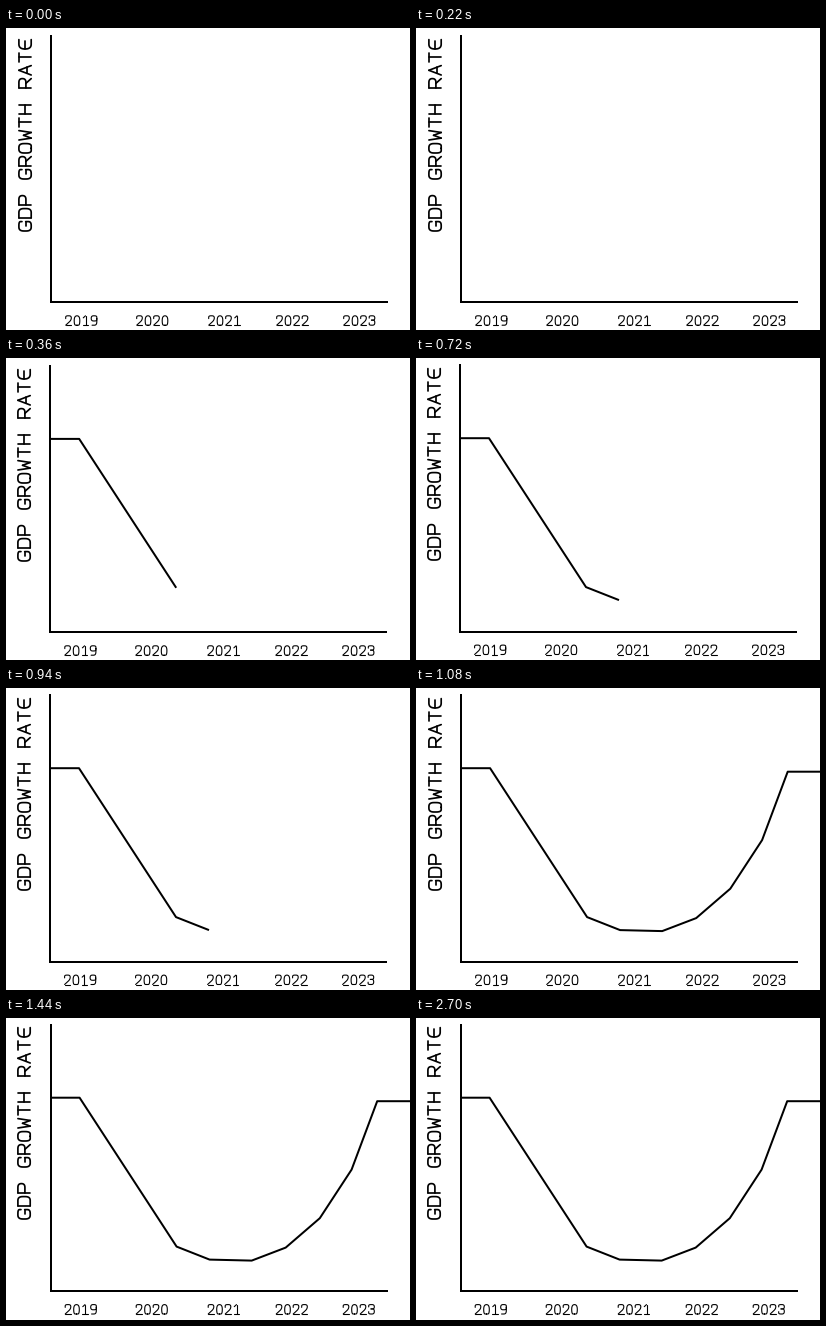
A matplotlib script that plays this animation: 404x302 px, repeating every 3540 ms.

```python
import matplotlib.pyplot as plt
import numpy as np
from matplotlib.animation import FuncAnimation
from matplotlib.collections import LineCollection

W, H, DPI = 404, 302, 64
TICK = 60            # ms per animation frame
HOLD = 6             # ticks per drawing step
TICKS = 59


def soft(*points, radius=.4):
    """One stroke through the points with its corners rounded."""
    pts = np.array(points, float)
    path = [pts[:1]]
    t = np.linspace(0, 1, 7)[:, None]
    for before, corner, after in zip(pts, pts[1:], pts[2:]):
        start, end = (corner + (p - corner) * min(.5, radius / np.hypot(*(p - corner)))
                      for p in (before, after))
        path.append((1 - t) ** 2 * start + 2 * t * (1 - t) * corner + t ** 2 * end)
    return [np.vstack(path + [pts[-1:]])]


def sharp(*points):
    return [np.array(pair, float) for pair in zip(points, points[1:])]


# Glyphs in a unit box, y pointing up.
STEM = sharp((0, 0), (0, 1))
BOWL = STEM + soft((0, 1), (1, 1), (1, .43), (0, .43))
GLYPHS = {
    "G": soft((1, .75), (1, 1), (0, 1), (0, 0), (1, 0), (1, .45)) + sharp((1, .45), (.55, .45)),
    "D": STEM + soft((0, 1), (1, 1), (1, 0), (0, 0)),
    "P": BOWL,
    "R": BOWL + sharp((.5, .43), (1, 0)),
    "O": soft((.5, 0), (0, 0), (0, 1), (1, 1), (1, 0), (.5, 0)),
    "W": sharp((0, 1), (.2, 0), (.5, .62), (.8, 0), (1, 1)),
    "T": sharp((0, 1), (1, 1)) + sharp((.5, 1), (.5, 0)),
    "H": STEM + sharp((1, 0), (1, 1)) + sharp((0, .5), (1, .5)),
    "A": sharp((0, 0), (.5, 1), (1, 0)) + sharp((.18, .34), (.82, .34)),
    "E": soft((1, 1), (0, 1), (0, 0), (1, 0), radius=.6) + sharp((0, .5), (.85, .5)),
    "0": soft((.5, 0), (0, 0), (0, 1), (1, 1), (1, 0), (.5, 0), radius=.5),
    "1": sharp((.1, .78), (.5, 1), (.5, 0)) + sharp((.05, 0), (.95, 0)),
    "2": soft((0, .7), (0, 1), (1, 1), (1, .55), (0, 0)) + sharp((0, 0), (1, 0)),
    "3": soft((0, .75), (0, 1), (1, 1), (1, .54), (.4, .54))
         + soft((.4, .54), (1, .54), (1, 0), (0, 0), (0, .25)),
    "9": soft((1, .7), (1, .45), (0, .45), (0, 1), (1, 1), (1, .7))
         + soft((1, .7), (1, 0), (.15, 0), radius=.7),
}

CURVE = np.array([(44, 80.9), (73.2, 80.9), (170.2, 229.8), (203.2, 242.8), (245.3, 243.8),
                  (279.3, 230.8), (313.4, 201.4), (345.2, 152.8), (370.8, 84.4), (406, 84.4)])
POINTS_SHOWN = [0, 3, 4, 10, 10]
YEAR_LEFT = [58, 129, 201, 269, 336]

# The whole drawing trembles by a fraction of a pixel.
WOBBLE = np.array([(.9, 0), (0, 0), (-.2, -.7), (.9, -.7), (.4, -1.2)])


def type_text(text, pitch, width, height):
    """Monospaced strokes from the origin, y pointing up."""
    return [stroke * (width, height) + (i * pitch, 0)
            for i, ch in enumerate(text)
            for stroke in GLYPHS.get(ch, [])]


LABEL = type_text("GDP GROWTH RATE", 13, 9.4, 12.3)
YEARS = [type_text(str(2019 + n), 8.5, 5.6, 9.4) for n in range(5)]


def label_strokes(shift):
    x, y = np.round((22.9, 202.6) + shift) + (1.2, 0)
    return [np.column_stack((x - s[:, 1], y - s[:, 0])) for s in LABEL]


def year_strokes(shift):
    return [(left + .8, 297.2) + shift + s * (1, -1)
            for left, year in zip(YEAR_LEFT, YEARS) for s in year]


def axis_strokes(shift):
    x, top = np.round((44.2, 6.8) + shift)
    right, base = np.round((381.4, 274.3) + shift)
    return [[(x, top), (x, base + 1)], [(x - 1, base), (right, base)]]


fig = plt.figure(figsize=(W / DPI, H / DPI), dpi=DPI, facecolor="white")
ax = fig.add_axes([0, 0, 1, 1])
ax.set_xlim(0, W)
ax.set_ylim(H, 0)
ax.axis("off")


def pen(width, cap="butt"):
    lines = LineCollection([], colors="black", linewidths=width * 72 / DPI,
                           capstyle=cap, joinstyle="round")
    return ax.add_collection(lines, autolim=False)


axis_pen = pen(2)
curve_pen = pen(2)
label_pen = pen(1.7, "round")
year_pen = pen(1.1, "round")


def update(tick):
    step = min(tick // HOLD, len(WOBBLE) - 1)
    shift = WOBBLE[step]
    shown = CURVE[:POINTS_SHOWN[step]] + shift
    axis_pen.set_segments(axis_strokes(shift))
    curve_pen.set_segments([shown] if len(shown) else [])
    label_pen.set_segments(label_strokes(shift))
    year_pen.set_segments(year_strokes(shift))
    return axis_pen, curve_pen, label_pen, year_pen


anim = FuncAnimation(fig, update, frames=TICKS, interval=TICK, repeat=True,
                     repeat_delay=0)
plt.show()
```
